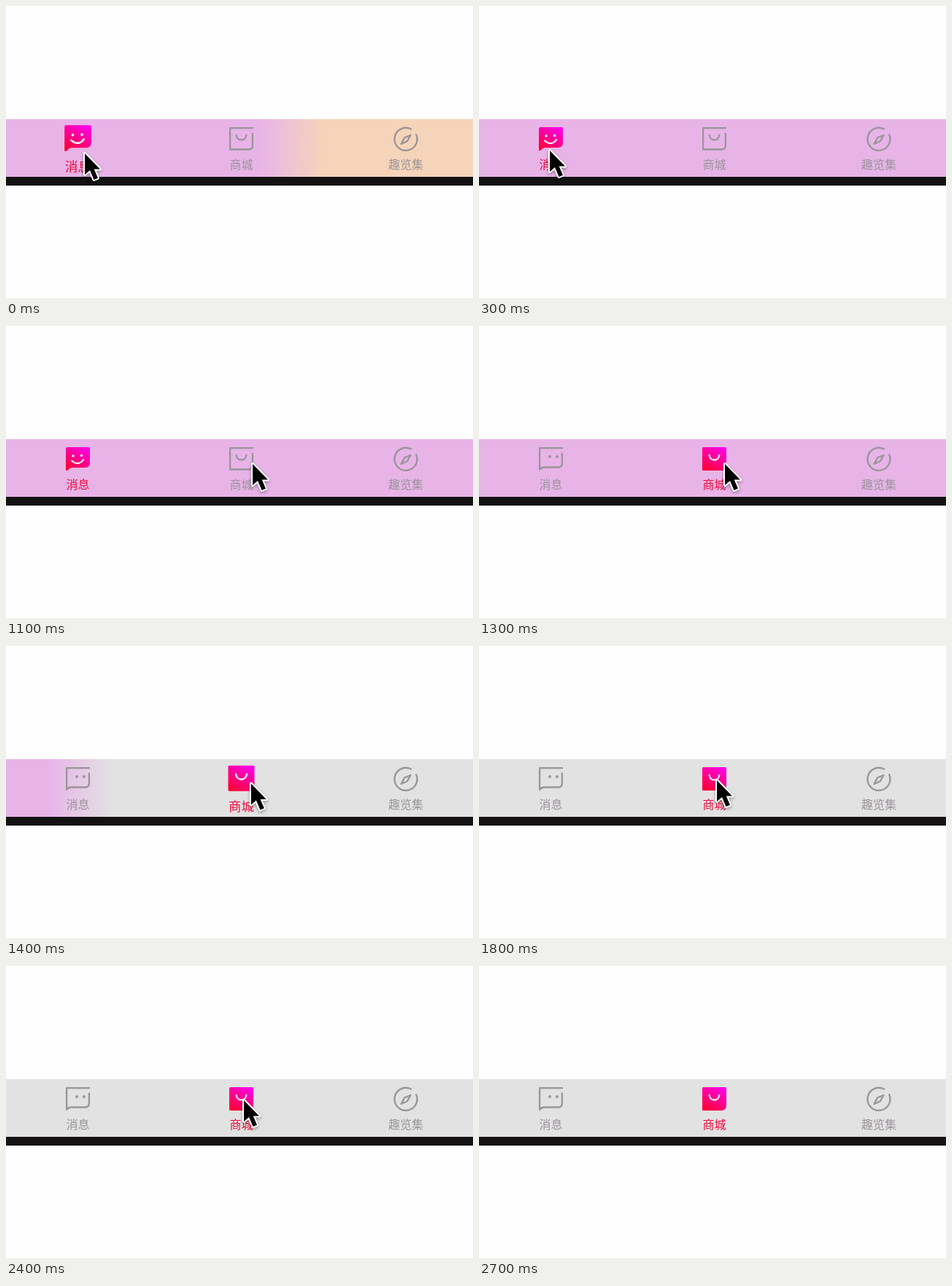
An HTML page with a canvas that plays this animation: 640x400 px, repeating every 2.9 s.

```html
<!DOCTYPE html>
<html lang="zh">
<head>
<meta charset="utf-8">
<style>
  html, body { margin: 0; width: 100%; height: 100%; overflow: hidden; background: #fefefe; }
  canvas { display: block; }
</style>
</head>
<body>
<canvas id="stage" width="640" height="400"></canvas>
<script>
const ctx = document.getElementById('stage').getContext('2d');
const LOOP = 2900, STEP = 100, BAR_TOP = 155, BAR_BOTTOM = 234;
const GRAY = '#999599', RED = '#ee0a3c';

// Icon paths are relative to the icon centre.
const smile = 'M-7 -6.5C-6 3.5 6 3.5 7 -6.5';
const tabs = [
  { x: 98.5, label: '消息',
    line: 'M16.5 -15.3H-15.4V14.3Q-13 11 -9 11H10Q15.4 11 15.4 5.5V-9',
    dots: [[-1.5, -3.5], [8.5, -3.5]],
    solid: 'M-16.5 -14.5Q-16.5 -16.5 -14.5 -16.5H14.5Q16.5 -16.5 16.5 -14.5V5Q16.5 11.5 10 11.5H-8Q-12 12 -14 15.5H-16.5Z',
    face: 'M-9 1.5Q1 10.5 8 0', eyes: [[-6.5, -4.5], [5, -5]] },
  { x: 322.5, label: '商城',
    line: 'M16.5 -15.3H-15.4V14H10Q15.4 14 15.4 8.5V-8.5' + smile,
    solid: 'M-16.5 -15Q-16.5 -16.5 -15 -16.5H15Q16.5 -16.5 16.5 -15V8.5Q16.5 15.5 9.5 15.5H-15Q-16.5 15.5 -16.5 14Z',
    face: smile },
  { x: 548, label: '趣览集',
    line: 'M8 -13.4A15.5 15.5 0 1 0 13.7 -7.3M6.5 -5.5L1.8 2.8L-6.5 6.5L-1.8 -2.3Z' }
];

// Each reveal spreads from its tab; speeds are px per ms.
const reveals = [
  { tab: 0, start: -133, from: '#f6d4b9', to: '#e8b4e8', left: 2.2, right: 2.2 },
  { tab: 1, start: 1300, from: '#e8b4e8', to: '#e2e2e2', left: 2.2, right: 4 }
];
const pointerKeys = [
  [0, 108, 201], [300, 97, 197], [600, 95, 200], [1100, 338, 188],
  [1300, 337, 188], [1800, 326, 183], [LOOP, 326, 183]
];
const clicks = [[1200, 1300], [2100, 2300]];
const pointerEnd = 2500;

const clamp = (v) => Math.min(1, Math.max(0, v));

function stroke(path, color, width) {
  ctx.strokeStyle = color;
  ctx.lineWidth = width;
  ctx.stroke(new Path2D(path));
}

function dots(points, color, radius) {
  ctx.fillStyle = color;
  for (const [x, y] of points) {
    ctx.beginPath();
    ctx.arc(x, y, radius, 0, 7);
    ctx.fill();
  }
}

function drawBar(reveal, t) {
  const age = t - reveal.start, x = tabs[reveal.tab].x;
  const soft = Math.min(45, age * reveal.left);
  const left = x - age * reveal.left, right = x + age * reveal.right;
  const fill = ctx.createLinearGradient(0, 0, 640, 0);
  const stop = (at, color) => fill.addColorStop(clamp(at / 640), color);
  stop(left - soft, reveal.from);
  stop(left + soft, reveal.to);
  stop(right - soft, reveal.to);
  stop(right + soft, reveal.from);
  ctx.fillStyle = fill;
  ctx.fillRect(0, BAR_TOP, 640, BAR_BOTTOM - BAR_TOP);
  ctx.fillStyle = '#131111';
  ctx.fillRect(0, BAR_BOTTOM, 640, 12);
}

function drawTab(tab, active, age) {
  const scale = active ? 1 + 0.12 * Math.sin(Math.PI * clamp(age / 360)) : 1;
  ctx.save();
  ctx.translate(tab.x, 191);
  ctx.scale(scale, scale);
  ctx.fillStyle = active ? RED : GRAY;
  ctx.fillText(tab.label, 0, 32.3);
  ctx.translate(0, -8.5);
  if (active) {
    const fill = ctx.createLinearGradient(-9, 15, 9, -16);
    fill.addColorStop(0, '#ff0038');
    fill.addColorStop(1, '#ff00e6');
    ctx.fillStyle = fill;
    ctx.fill(new Path2D(tab.solid));
    stroke(tab.face, '#fff', 2.2);
    dots(tab.eyes || [], '#fff', 1.7);
  } else {
    stroke(tab.line, GRAY, 2.3);
    dots(tab.dots || [], GRAY, 2);
  }
  ctx.restore();
}

function pointerAt(t) {
  const i = pointerKeys.findIndex((key) => key[0] > t);
  const [t0, x0, y0] = pointerKeys[i - 1], [t1, x1, y1] = pointerKeys[i];
  const u = (t - t0) / (t1 - t0), k = u * u * (3 - 2 * u);
  return [x0 + (x1 - x0) * k, y0 + (y1 - y0) * k];
}

function drawPointer(t) {
  const [x, y] = pointerAt(t);
  ctx.save();
  ctx.translate(x, y);
  if (clicks.some(([down, up]) => t >= down && t < up)) {
    const ring = 'M-51 4A50 50 0 1 0 49 4A50 50 0 1 0 -51 4Z';
    stroke(ring, '#fff', 5.5);
    stroke(ring, '#111', 3.2);
  }
  const arrow = 'M0 1V30L7 24L12.5 37L18 34.7L12.7 22.5H21Z';
  ctx.save();
  ctx.shadowColor = 'rgba(0,0,0,.35)';
  ctx.shadowBlur = 4;
  ctx.shadowOffsetY = 2;
  stroke(arrow, '#fff', 4);
  ctx.restore();
  ctx.fillStyle = '#000';
  ctx.fill(new Path2D(arrow));
  ctx.restore();
}

function draw(now) {
  const t = Math.floor((now % LOOP) / STEP) * STEP;
  const reveal = reveals[t < reveals[1].start ? 0 : 1];
  ctx.fillStyle = '#fefefe';
  ctx.fillRect(0, 0, 640, 400);
  ctx.save();
  ctx.beginPath();
  ctx.rect(0, BAR_TOP, 640, 91);
  ctx.clip();
  ctx.font = '16px "Noto Sans CJK SC", "Noto Sans CJK", sans-serif';
  ctx.textAlign = 'center';
  ctx.lineJoin = 'round';
  drawBar(reveal, t);
  tabs.forEach((tab, i) => drawTab(tab, i === reveal.tab, t - reveal.start));
  if (t < pointerEnd) drawPointer(t);
  ctx.restore();
  requestAnimationFrame(draw);
}
requestAnimationFrame(draw);
</script>
</body>
</html>
```
